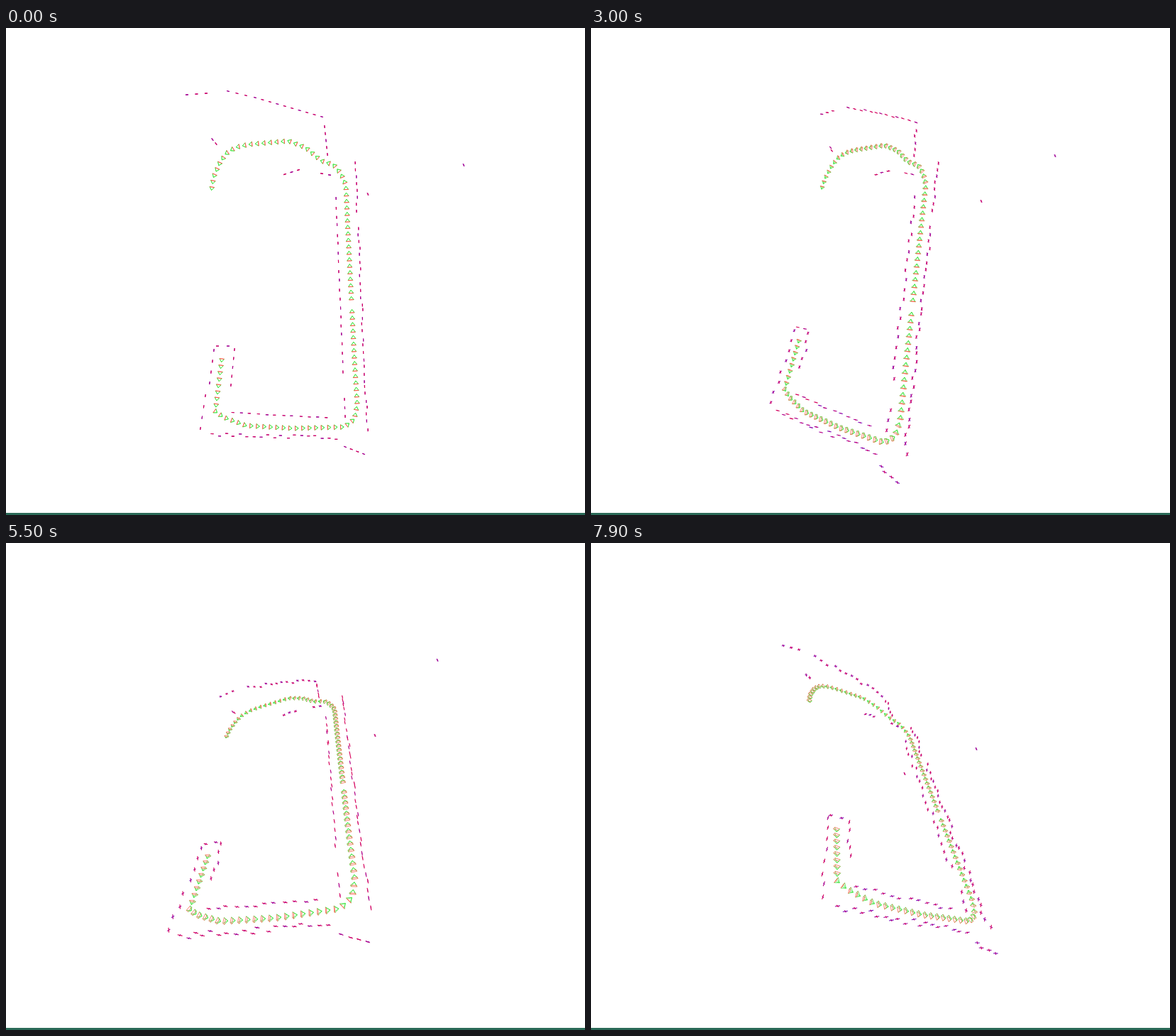
An HTML page with a canvas that plays this animation: 816 px wide and 686 px high, repeating every 8 s.

```html
<!DOCTYPE html>
<html lang="en">
<head>
<meta charset="utf-8">
<title>Trajectory viewer</title>
<style>
html, body { margin: 0; width: 100%; height: 100%; overflow: hidden; background: #fff; }
canvas { display: block; width: 100vw; height: 100vh; }
</style>
</head>
<body>
<canvas id="view" width="816" height="686"></canvas>
<script>
const ctx = document.getElementById('view').getContext('2d');
const LOOP = 8000, STEP = 100;

let seed = 7;
const rand = () => (seed = (seed * 16807) % 2147483647) / 2147483647;
const spread = size => (rand() - 0.5) * size;
const mix = (a, b, k) => a + (b - a) * k;

// The view only moves inside these intervals (first and last step, ms).
const drags = [[900, 1200], [1400, 2100], [2400, 2600], [2800, 3600], [3800, 4100], [4300, 4700],
  [5100, 5300], [5500, 5700], [5900, 6700], [6800, 7500], [7800, 7900]];
const stepsAt = t => drags.reduce((sum, [a, b]) =>
  sum + Math.max(0, Math.min(Math.floor((t - a) / STEP) + 1, (b - a) / STEP + 1)), 0);

// Each view: where four ground corners land on screen, then two stray points.
const plan = [[310, 177], [479, 221], [477, 562], [295, 540], [645, 193], [510, 234]];
const leaning = [[335, 163], [475, 232], [465, 551], [319, 555], [584, 226], [487, 206]];
const turned = [[347, 184], [472, 220], [413, 584], [273, 509], [654, 180], [550, 244]];
const low = [[338, 237], [465, 227], [446, 533], [256, 522], [616, 152], [528, 262]];
const lowRight = [[331, 244], [463, 234], [470, 515], [259, 516], [608, 165], [520, 271]];
const below = [[286, 220], [372, 310], [609, 460], [553, 366], [651, 487], [356, 380]];
const side = [[320, 202], [449, 273], [533, 533], [347, 476], [543, 290], [442, 325]];

// Barycentric weights of (x, y) in the triangle of the first three points.
function weights([p, q, r], x, y) {
  const [px, py, rx, ry] = [p[0] - q[0], p[1] - q[1], r[0] - q[0], r[1] - q[1]];
  const dx = x - q[0], dy = y - q[1], det = px * ry - rx * py;
  const a = (dx * ry - rx * dy) / det, c = (px * dy - dx * py) / det;
  return [a, 1 - a - c, c];
}

// Projective map from the plan, as homogeneous corners scaled to depth 1 at the centre.
function projection(view) {
  const from = weights(plan, ...plan[3]), to = weights(view, ...view[3]);
  const depth = to.map((w, i) => w / from[i]);
  const centre = weights(plan, 400, 370).reduce((sum, w, i) => sum + w * depth[i], 0);
  return depth.map((d, i) => [view[i][0], view[i][1], 1].map(v => v * d / centre));
}

const keys = [];
function key(time, view, sx = 1, dx = 0, sy = 1, dy = 0) {
  const placed = view.map(([x, y]) => [x * sx + dx, y * sy + dy]);
  keys.push({ at: stepsAt(time), rows: [...projection(placed), ...placed.slice(4)] });
}
key(0, plan);
key(1600, leaning);
key(2100, leaning, 1, -27, 1.045, -18);
key(3000, turned);
key(3600, turned, 1, -8, 0.977, 14.6);
key(3900, low);
key(4100, low, 0.98, -15.5, 0.62, 106);
key(4700, low, 1.08, -76, 0.5, 119);
key(5300, lowRight, 1, 0, 1, 1);
key(5500, lowRight);
key(5700, lowRight, 1, -14, 1.23, -103);
key(6500, below);
key(7500, side, 1.25, -100, 0.82, 56);
key(7900, side);

function stateAt(t) {
  const s = stepsAt(t);
  const i = Math.max(0, Math.min(keys.length - 2, keys.findIndex(k => k.at > s) - 1 + (s >= keys[keys.length - 1].at) * keys.length));
  const a = keys[i], b = keys[i + 1], k = (s - a.at) / (b.at - a.at);
  return a.rows.map((row, r) => row.map((v, c) => mix(v, b.rows[r][c], k)));
}

// Poses: even steps along the driven path, with one left out.
const route = [[290, 226], [293, 209], [301, 191], [310, 177], [324, 168], [342, 164], [398, 159],
  [423, 169], [444, 187], [462, 193], [472, 205], [479, 221], [482, 288], [487, 386], [491, 466],
  [495, 530], [491, 551], [477, 562], [405, 564], [338, 560], [306, 548], [295, 540], [304, 468]];
const POSES = 95, GAP = 46;
const legs = route.slice(1).map(([x, y], i) => {
  const [px, py] = route[i];
  return { x: px, y: py, len: Math.hypot(x - px, y - py), angle: Math.atan2(y - py, x - px) };
});
const total = legs.reduce((sum, leg) => sum + leg.len, 0);
const poses = [];
for (let i = 0; i < POSES; i++) {
  if (i === GAP) continue;
  let d = total * i / (POSES - 1), n = 0;
  while (n < legs.length - 1 && d > legs[n].len) d -= legs[n++].len;
  const { x, y, angle } = legs[n], fx = Math.cos(angle), fy = Math.sin(angle);
  poses.push({ x: x + fx * d, y: y + fy * d, fx: -fx, fy: -fy });
}

// Wall marks: evenly spaced along straight runs, at random heights.
const marks = [];
function run(x0, y0, x1, y1, n, wobbleX = 0, wobbleY = 0) {
  const len = Math.hypot(x1 - x0, y1 - y0);
  for (let i = 0; i < n; i++) {
    const k = i / (n - 1);
    marks.push({ x: mix(x0, x1, k) + spread(wobbleX), y: mix(y0, y1, k) + spread(wobbleY),
      dx: (x1 - x0) / len, dy: (y1 - y0) / len, z: spread(7) });
  }
}
run(255, 94, 282, 92, 3);
run(313, 89, 338, 95, 3);
run(351, 98, 445, 125, 10);
run(449, 139, 453, 178, 5);
run(291, 157, 296, 163, 2);
run(393, 206, 412, 200, 3);
run(445, 205, 456, 207, 2);
run(493, 190, 495, 258, 8, 2);
run(465, 240, 475, 483, 20, 0.6, 3);
run(496.5, 281, 509, 565, 30, 2.6, 4);
run(477, 523, 478, 547, 3);
run(298, 448, 313, 448, 2);
run(322, 453, 317, 503, 5);
run(293, 454, 287, 500, 4);
run(281, 518, 274, 564, 4);
run(319, 542, 451, 549, 12, 2, 1);
run(291, 573, 465, 577, 19, 2, 5);
run(478, 590, 504, 600, 4);

function line(color, ...pts) {
  ctx.strokeStyle = color;
  ctx.beginPath();
  pts.forEach(([x, y]) => ctx.lineTo(x, y));
  ctx.stroke();
}

function drawMark(x, y, dx, dy, ux, uy, i) {
  const cross = (sign, color) => line(color,
    [x - dx - sign * ux, y - dy - sign * uy], [x + dx + sign * ux, y + dy + sign * uy]);
  cross(1, i % 3 ? '#a000a0' : '#7a10c0');
  cross(-1, i % 3 ? '#d80058' : '#b40082');
}

function draw(t) {
  const state = stateAt(t);
  const project = (x, y) => {
    const w = weights(plan, x, y);
    const [u, v, depth] = [0, 1, 2].map(c => w.reduce((sum, k, i) => sum + k * state[i][c], 0));
    return [u / depth, v / depth];
  };
  // Local frame: ground axes, and the up axis implied by their foreshortening.
  const frameAt = (x, y) => {
    const [px, py] = project(x, y), [ax, ay] = project(x + 1, y), [bx, by] = project(x, y + 1);
    const [a, b, c, d] = [ax - px, ay - py, bx - px, by - py];
    const diff = a * a + c * c - b * b - d * d, cross = 2 * (a * b + c * d);
    const angle = Math.atan2(cross, diff) / 2, tall = Math.sqrt(Math.hypot(diff, cross));
    const sign = Math.cos(angle) > 0 ? -1 : 1;
    const ux = -Math.sin(angle) * tall * sign, uy = Math.cos(angle) * tall * sign;
    return (gx, gy, h) => [px + a * gx + c * gy + ux * h, py + b * gx + d * gy + uy * h];
  };

  ctx.fillStyle = '#fff';
  ctx.fillRect(0, 0, 816, 686);
  ctx.lineWidth = 1.1;
  marks.forEach((m, i) => {
    const at = frameAt(m.x, m.y);
    const [x, y] = at(0, 0, m.z), [ex, ey] = at(m.dx * 2, m.dy * 2, m.z), [tx, ty] = at(0, 0, m.z + 1.6);
    drawMark(x, y, ex - x, ey - y, tx - x, ty - y, i);
  });
  state.slice(3).forEach(([x, y], i) => drawMark(x, y, 0.7, 1.8, 0.5, 0, i));

  ctx.lineWidth = 0.65;
  poses.forEach(({ x, y, fx, fy }) => {
    const frame = frameAt(x, y);
    const at = (f, s, h) => frame(fx * f - fy * s, fy * f + fx * s, h);
    const tip = at(2.6, 0, 0);
    const a = at(-2, -3.3, 1.6), b = at(-2, 3.3, 1.6), c = at(-2, 3.3, -1.6), d = at(-2, -3.3, -1.6);
    line('#20e020', a, tip, b);
    line('#20e020', c, tip, d, a);
    line('#ff4028', a, b, c, d);
  });

  ctx.fillStyle = '#2b6a58';
  ctx.fillRect(0, 683, 816, 3);
}

let start = null, shown = -1;
function tick(now) {
  if (start === null) start = now;
  const t = Math.floor(((now - start) % LOOP) / STEP) * STEP;
  if (t !== shown) draw(shown = t);
  requestAnimationFrame(tick);
}
draw(0);
requestAnimationFrame(tick);
</script>
</body>
</html>
```
